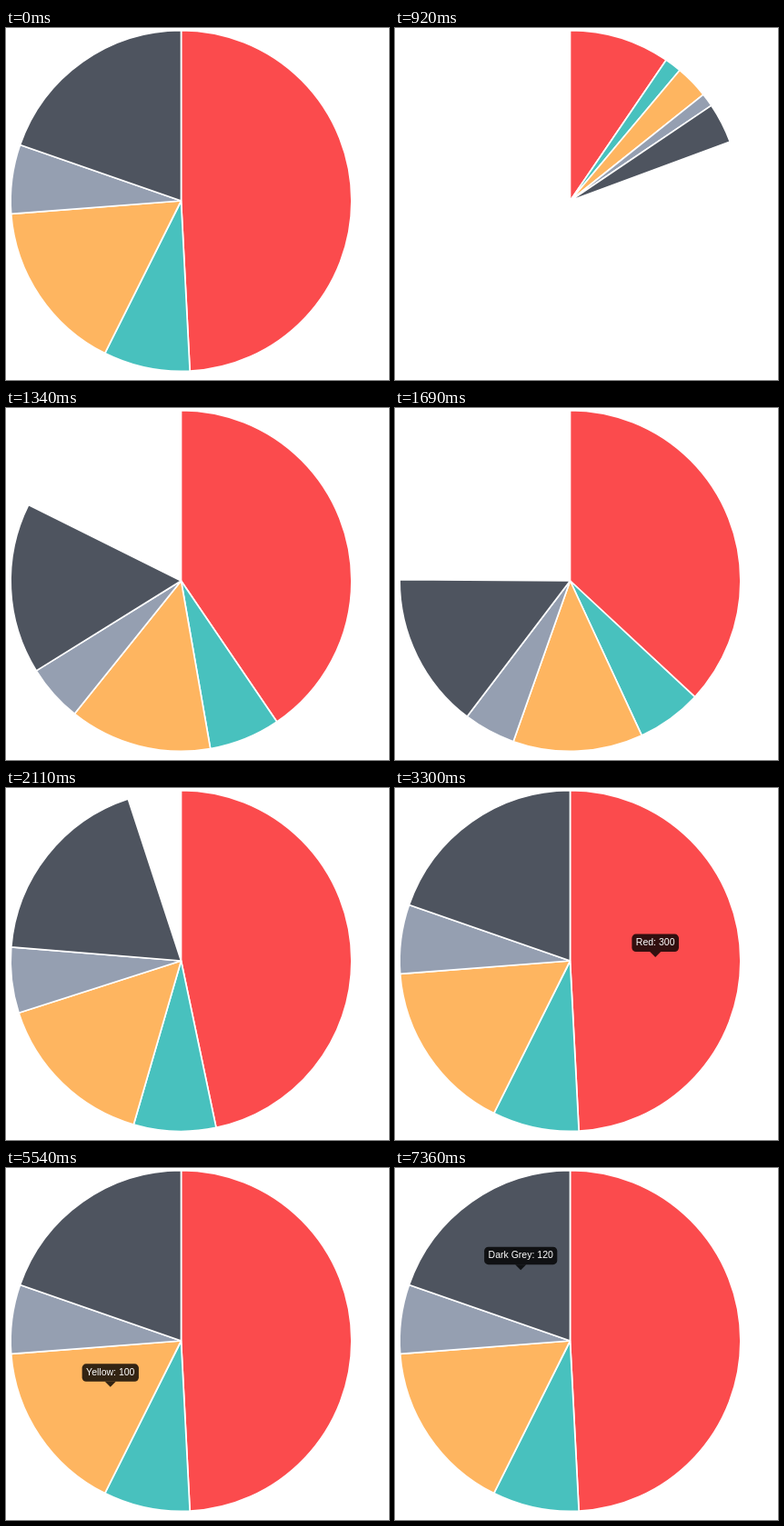
An HTML page with a canvas that plays this animation: 421 px wide and 387 px high, repeating every 8 s.

```html
<!DOCTYPE html>
<html lang="en">
<head>
<meta charset="utf-8">
<title>Pie chart</title>
<style>
  html, body { margin: 0; width: 100%; height: 100%; overflow: hidden; background: #fff; }
  canvas { display: block; width: 421px; height: 387px; }
</style>
</head>
<body>
<canvas id="chart"></canvas>
<script>
const WIDTH = 421, HEIGHT = 387, LOOP = 8000;
const CENTRE = { x: 192.5, y: 190 }, RADIUS = 187.4;
const TAU = Math.PI * 2;

const slices = [
  { label: 'Red', value: 300, color: '#fb4b4d' },
  { label: 'Green', value: 50, color: '#48c1be' },
  { label: 'Yellow', value: 100, color: '#feb560' },
  { label: 'Grey', value: 40, color: '#959fb1' },
  { label: 'Dark Grey', value: 120, color: '#4e545f' }
];
const total = slices.reduce((sum, s) => sum + s.value, 0);

// The pie opens in ticks; each pair is [tick, progress].
const OPEN_AT = 500, TICK = 70;
const pace = [[0, 0], [6, 0.16], [12, 0.33], [23, 0.778], [29, 1]];

// When each slice, in order, gets its tooltip.
const hoverTimes = [3300, 4630, 5540, 6520, 7360];

const canvas = document.getElementById('chart');
const ctx = canvas.getContext('2d');
const ratio = window.devicePixelRatio || 1;
canvas.width = WIDTH * ratio;
canvas.height = HEIGHT * ratio;
ctx.scale(ratio, ratio);

function easeOutBounce(t) {
  const k = 7.5625, d = 2.75;
  if (t < 1 / d) return k * t * t;
  if (t < 2 / d) return k * (t - 1.5 / d) ** 2 + 0.75;
  if (t < 2.5 / d) return k * (t - 2.25 / d) ** 2 + 0.9375;
  return k * (t - 2.625 / d) ** 2 + 0.984375;
}

function openness(time) {
  if (time < OPEN_AT) return 1;
  const tick = Math.floor((time - OPEN_AT) / TICK);
  const next = pace.findIndex(([at]) => at > tick);
  if (next < 0) return 1;
  const [t0, p0] = pace[next - 1], [t1, p1] = pace[next];
  return easeOutBounce(p0 + (p1 - p0) * (tick - t0) / (t1 - t0));
}

function drawPie(open) {
  let start = -TAU / 4;
  ctx.lineWidth = 1.7;
  ctx.lineJoin = 'bevel';
  ctx.strokeStyle = '#fff';
  for (const { value, color } of slices) {
    const end = start + TAU * open * value / total;
    ctx.beginPath();
    ctx.arc(CENTRE.x, CENTRE.y, RADIUS, start, end);
    ctx.lineTo(CENTRE.x, CENTRE.y);
    ctx.closePath();
    ctx.fillStyle = color;
    ctx.fill();
    ctx.stroke();
    start = end;
  }
}

function drawTooltip(index) {
  const { label, value } = slices[index];
  const before = slices.slice(0, index).reduce((sum, s) => sum + s.value, 0);
  const angle = TAU * (before + value / 2) / total - TAU / 4;
  const x = CENTRE.x + Math.cos(angle) * RADIUS / 2;
  const tip = CENTRE.y + Math.sin(angle) * RADIUS / 2 - 1.5;
  const text = `${label}: ${value}`;
  const caret = 6, height = 19.5, bottom = tip - caret;

  ctx.font = '10.5px "Liberation Sans", Arial, sans-serif';
  ctx.textAlign = 'center';
  ctx.textBaseline = 'middle';
  const width = ctx.measureText(text).width + 9;

  ctx.fillStyle = 'rgba(0, 0, 0, 0.8)';
  ctx.beginPath();
  ctx.moveTo(x, tip);
  ctx.lineTo(x + caret, bottom);
  ctx.lineTo(x - caret, bottom);
  ctx.fill();
  ctx.beginPath();
  ctx.roundRect(x - width / 2, bottom - height, width, height, 4.5);
  ctx.fill();

  ctx.fillStyle = '#fff';
  ctx.fillText(text, x, bottom - height / 2);
}

function render(time) {
  ctx.fillStyle = '#fff';
  ctx.fillRect(0, 0, WIDTH, HEIGHT);
  const open = openness(time);
  if (open > 0) drawPie(open);
  const hovered = hoverTimes.filter(at => time >= at).length - 1;
  if (hovered >= 0) drawTooltip(hovered);
}

const began = performance.now();
function loop() {
  render((performance.now() - began) % LOOP);
  requestAnimationFrame(loop);
}
loop();
</script>
</body>
</html>
```
